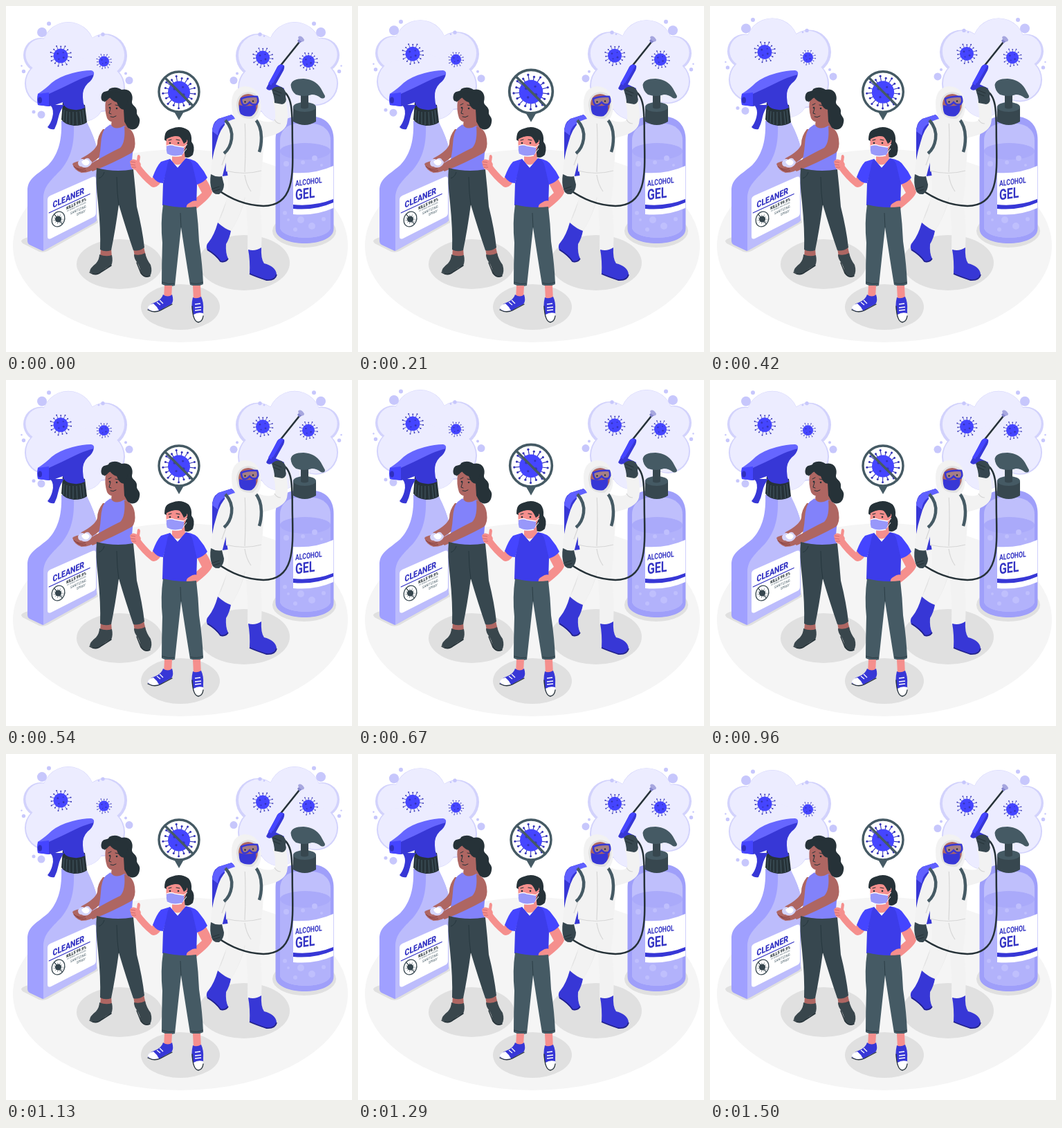
Write an HTML page that moves like this. It is 500 by 500 pixels and loops after 1.54 s.

```html
<!DOCTYPE html>
<html lang="en">
<head>
<meta charset="utf-8">
<title>Cleaning and disinfection</title>
<style>
html, body { margin: 0; width: 100%; height: 100%; overflow: hidden; background: #fff; }
svg { display: block; width: 100%; height: 100%; }
text { font-family: Roboto, "Open Sans", sans-serif; font-weight: 700; fill: #3434c4; }
.heavy { font-weight: 900; }
.note { font-weight: 400; fill: #455a64; }
.ink { fill: #263238; }
.slate { fill: #37474f; }
.steel { fill: #455a64; }
.boot { fill: #39464c; }
.blue { fill: #4545ff; }
.deep { fill: #3737d6; }
.suit { fill: #f2f2f2; }
.fold { fill: #e2e2e2; }
.brown { fill: #ae6662; }
.pink { fill: #f58f8d; }
.white { fill: #fff; }
.shade { fill: #e0e0e0; }
.line { fill: none; stroke: #263238; stroke-linecap: round; stroke-linejoin: round; }
</style>
</head>
<body>
<svg viewBox="0 0 500 500">
  <ellipse cx="252" cy="346.500" rx="242" ry="139.500" fill="#f5f5f5"/>

  <g id="clouds"></g>

  <g class="shade">
    <ellipse cx="164" cy="373" rx="62" ry="36"/>
    <ellipse cx="344" cy="371" rx="66" ry="40"/>
    <ellipse cx="252" cy="435" rx="57" ry="33"/>
    <ellipse cx="431" cy="325" rx="46" ry="24"/>
    <path d="M22 340Q22 337 32 334L130 300L133 313L60 354Q54 357 48 355L24 343Z"/>
  </g>

  <!-- spray bottle -->
  <g>
    <path fill="#a0a0ff" d="M80 166C81 191 77 213 61 230C45 244 31 249 31 267V340Q31 343 34 345L53 354L131 310V205Q128 190 117 170Z"/>
    <path fill="#bcbcfc" d="M98 172C99 199 94 219 80 236C66 251 54 260 54 278V354L128 313Q131 311 131 307V205Q128 190 117 168Z"/>
    <path class="white" d="M60 280Q60 276 64 274L125 247Q130 245 130 250V299Q130 303 126 305L65 336Q60 338 60 333Z"/>
    <g transform="matrix(.82 -.38 0 1 67.500 292)">
      <text class="heavy" font-size="12.800">CLEANER</text>
      <path d="M-7 4.500H66" stroke="#3434c4" stroke-width="1.300"/>
      <text class="heavy" x="24" y="11.500" font-size="6.200" style="fill:#263238">KILLS 99.9%</text>
      <text class="note" x="25" y="15" font-size="3">OF GERMS AND VIRUSES</text>
      <text class="note" x="31" y="21.500" font-size="5.200">SANITIZING</text>
      <text class="note" x="42" y="27.500" font-size="5.200">SPRAY</text>
    </g>
    <g transform="translate(75.500 308) rotate(24)">
      <ellipse rx="9" ry="11.200" class="white" stroke="#37474f" stroke-width="1.300"/>
      <g id="badge"></g>
      <path d="M-8-4L8 4" stroke="#37474f" stroke-width="1.200"/>
    </g>
    <path class="ink" d="M82 139L80 164Q84 171 98 173Q111 173 117 168L114 143Z"/>
    <path d="M84 150L83 166M88 152L87 169M92 153V171M97 153V172M102 153L103 172M107 152L109 171M111 150L113 169" stroke="#455a64" stroke-width="1"/>
    <path class="deep" d="M64 143Q70 150 67 161Q65 169 60 175Q64 179 70 178Q74 170 76 160Q78 151 84 143Z"/>
    <path class="deep" d="M46 127L62 121L108 103L127 98Q126 106 118 112Q110 120 111 132Q111 140 114 147Q105 152 93 149Q84 147 82 139Q73 143 62 145L46 143Z"/>
    <path fill="#6666ff" d="M46 127Q58 119 66 111Q77 102 96 97Q111 93 123 93Q128 94 127 99Q112 103 100 109Q82 118 62 127Z"/>
    <path class="blue" d="M46 127L62 125V145L46 143Q44 135 46 127Z"/>
    <ellipse cx="49" cy="136" rx="3" ry="4.500" fill="#2f2fbe"/>
  </g>

  <!-- gel bottle -->
  <g>
    <path fill="#9f9ffa" d="M389.500 193C389.500 173 402 162 416 160H447C462 162 473.500 173 473.500 193V322C473.500 350 389.500 350 389.500 322Z"/>
    <path fill="#bfbffc" d="M396 194C396 180 407 171 419 170H444C458 171 469 180 469 194V319C469 340 396 340 396 319Z"/>
    <path fill="#b2b2fb" d="M396 209C396 196 469 196 469 209V319C469 340 396 340 396 319Z"/>
    <ellipse cx="432.500" cy="210" rx="36.500" ry="12" fill="#aaaafa"/>
    <g fill="#bfbffd">
      <circle cx="429" cy="226" r="3"/><circle cx="446" cy="220" r="4"/><circle cx="456" cy="230" r="2"/>
      <circle cx="405" cy="228" r="4"/><circle cx="403" cy="299" r="3"/><circle cx="426" cy="309" r="5"/>
      <circle cx="442" cy="318" r="5"/><circle cx="459" cy="308" r="3"/><circle cx="418" cy="323" r="3"/><circle cx="408" cy="309" r="2"/>
    </g>
    <path class="white" d="M415 241Q447 243 473 231V292Q446 304 415 301Z"/>
    <path class="deep" d="M415 287Q446 290 473 279V284Q446 296 415 293Z"/>
    <g transform="matrix(.74 -.1 0 1 418 260.500)">
      <text font-size="11.700">ALCOHOL</text>
      <text y="20" font-size="21.500">GEL</text>
    </g>
    <path class="slate" d="M415 146Q431 137 448 146V167Q432 177 415 167Z"/>
    <ellipse cx="431.500" cy="146" rx="16.500" ry="7" class="steel"/>
    <path class="slate" d="M426 123H437V147Q431 150 426 147Z"/>
    <path class="steel" d="M411.500 114Q413 105 430 105Q447 106 455 119L461 130Q461 135 455 133Q449 128 442 128Q431 132 419 128Q412 123 411.500 114Z"/>
  </g>

  <!-- worker -->
  <g>
    <path class="deep" d="M298 184Q297 169 307 163L326 157L336 169L330 244L312 246Q298 237 298 225Z"/>
    <path fill="#6060ff" d="M298 181Q299 169 307 163L326 157L333 163L314 171Q307 176 306 187Z"/>
    <path class="fold" d="M321 231L328 260Q315 288 306 314L325 325Q345 294 350 255Z"/>
    <path class="suit" d="M319 233Q335 250 346 278Q350 315 349 353Q360 357 369 350Q371 315 366 281Q370 260 369 232Z"/>
    <path class="suit" d="M319 235Q327 276 306 314L325 325Q344 296 348 258Z"/>
    <path class="suit" d="M316 169Q332 160 348 162Q363 160 371 170Q374 204 369 239Q344 246 318 239Z"/>
    <path class="suit" d="M364 164Q382 171 389 164Q390 151 386 138L404 135Q409 156 406 170Q402 185 370 191Z"/>
    <path class="suit" d="M320 168Q309 177 304 198Q296 223 296 246L312 249Q318 223 326 203Z"/>
    <path d="M345 164Q347 200 345 240M318 238Q344 245 369 238M345 244Q347 258 354 268M388 164Q391 170 397 170M321 205L312 230" fill="none" stroke="#d6d6d6" stroke-width="1.200"/>
    <path d="M317 165Q328 177 326 192Q324 206 315 213" fill="none" stroke="#455a64" stroke-width="4.500"/>
    <path d="M359 162Q369 173 369 190Q369 202 366 211" fill="none" stroke="#455a64" stroke-width="4.500"/>

    <path class="suit" d="M326 141Q326 119 344 116Q362 116 367 133Q372 156 361 166Q347 174 333 166Q326 158 326 141Z"/>
    <path class="fold" d="M333 144Q333 126 350 124Q364 125 366 137Q368 155 356 163Q341 164 335 154Z"/>
    <path class="brown" d="M336 142Q337 128 350 127Q363 128 364 141Q364 153 355 158H343Q337 152 336 142Z"/>
    <path class="deep" d="M337 143Q347 146 361 143Q363 154 355 159Q346 161 339 156Q336 151 337 143Z"/>
    <path d="M340 134Q350 130 363 131Q366 138 362 142Q356 144 352 139Q348 144 343 143Q340 140 340 134Z" fill="#a57f86" stroke="#3737d6" stroke-width="2.600"/>
    <g class="ink"><circle cx="345.500" cy="138.500" r="1.200"/><circle cx="357" cy="137.500" r="1.200"/></g>

    <path class="deep" d="M306 313Q316 322 325 325Q323 336 318 344Q317 357 321 365Q318 371 310 370Q304 361 291 353Q288 346 293 341Q301 331 306 313Z"/>
    <path d="M291 352Q304 360 310 369Q317 371 321 365" fill="none" stroke="#22228c" stroke-width="1.800"/>
    <path class="deep" d="M350 352Q360 355 369 349Q368 365 373 372Q389 376 391 387Q389 396 376 396Q361 391 352 387Q353 368 350 352Z"/>
    <path d="M352 387Q361 391 376 396Q389 397 391 388" fill="none" stroke="#22228c" stroke-width="1.800"/>

    <path class="line" stroke-width="2.500" d="M398 122C417 129 413 165 414 198C415 245 416 289 372 289C342 288 320 276 304 264"/>
    <path class="line" stroke-width="2.600" d="M396 87L424 52"/>
    <path d="M421 50L426 45L431 49L424 54Z" fill="#8484cd"/>
    <ellipse cx="426.500" cy="47.500" rx="5" ry="3" transform="rotate(40 426.500 47.500)" fill="#a6a6df"/>
    <path class="deep" d="M376 119L392 88Q396 82 402 86Q403 90 400 95L386 120Q379 124 376 119Z"/>
    <path class="blue" d="M392 89Q396 82 401 86L384 115L379 112Z"/>
    <path class="deep" d="M385 111L402 119L398 126L382 118Z"/>
    <path class="slate" d="M384 121Q389 115 398 117Q406 122 404 131Q407 140 399 142L388 140Q388 132 384 121Z"/>
    <path d="M386 121L398 126M386 126L396 130" class="line" stroke-width="1"/>
    <path class="slate" d="M296 243Q304 248 312 246L315 258Q315 267 308 272Q299 273 297 265Q294 255 296 243Z"/>
    <path d="M299 264L308 261M300 268L309 265" class="line" stroke-width="1"/>
  </g>

  <!-- woman washing hands -->
  <g>
    <path class="ink" d="M148 133C140 143 136 135 138 129C140 121 148 125 149 120C156 116 163 118 167 121C179 118 185 128 182 138C181 144 190 145 189 153C188 159 195 160 193 168C192 177 184 181 178 177C171 184 160 178 162 168Z"/>
    <path class="brown" d="M140 178Q132 188 132 199Q130 209 109 220L104 228L113 233Q133 222 143 211Q151 195 148 178Z"/>
    <path class="brown" d="M153 161L152 174Q159 187 176 176L171 167L170 149Z"/>
    <path fill="#8282fa" d="M144 176L151 171Q157 181 171 173L179 178Q185 192 184 207Q181 221 183 237Q158 243 131 235Q136 215 137 200Q138 182 144 176Z"/>
    <path class="brown" d="M144 137Q142 150 146 162Q150 170 160 166Q169 161 170 150Q172 146 168 143Q162 145 159 131Q151 130 144 137Z"/>
    <path class="ink" d="M142 139Q142 126 154 124Q170 123 176 137L172 150Q164 151 160 139Q155 138 150 132Q147 136 142 139Z"/>
    <path d="M148 143L152 141M158 143L163 144M151 148L149 155L152 156M151 160Q155 162 159 159" class="line" stroke-width="1"/>
    <g class="ink"><circle cx="150" cy="147" r="1.300"/><circle cx="160" cy="148" r="1.300"/></g>
    <path class="brown" d="M171 174Q184 177 186 192Q188 206 182 212Q157 226 125 239L117 231Q148 213 165 205Q173 197 171 174Z"/>
    <path class="brown" d="M96 228Q104 222 118 225L129 233Q123 241 109 241Q98 237 96 228Z"/>
    <path d="M104 226Q108 219 113 222Q119 217 122 223Q126 225 122 230Q116 236 109 232Q104 232 104 226Z" fill="#d4d4fa"/>
    <path class="white" d="M109 225Q114 219 119 223Q123 226 118 230Q112 232 109 225Z"/>
    <path d="M98 232Q106 238 115 235M102 235Q108 240 116 238" fill="none" stroke="#843f40" stroke-width="1"/>
    <path class="brown" d="M137 350H152L153 363H136ZM184 350L199 348L202 361L186 363Z"/>
    <path class="slate" d="M131 234Q158 241 184 236Q187 264 189 290Q197 322 200 349Q192 355 184 353Q174 324 163 287Q158 324 152 353Q143 356 136 352Q137 323 133 284Q129 253 131 234Z"/>
    <path d="M160 247L161 270L163 288M142 240Q140 247 134 249" fill="none" stroke="#26373e" stroke-width="1"/>
    <path class="boot" d="M135 359Q144 363 153 360Q155 369 152 375Q144 378 138 384Q129 391 121 384Q121 379 130 372Q135 366 135 359Z"/>
    <path class="boot" d="M185 359Q194 361 201 357Q203 366 209 374Q212 384 208 390Q201 394 195 386Q193 375 189 370Q185 365 185 359Z"/>
    <path d="M121 385Q130 391 138 384L152 375M189 371L195 386Q201 394 208 390" class="line" stroke-width="1.500"/>
  </g>

  <!-- pin -->
  <g id="pin">
    <path class="steel" d="M242 151L250 165L258 151Z"/>
    <circle cx="250" cy="124" r="29" fill="#fff" stroke="#455a64" stroke-width="3.400"/>
    <g id="pinVirus"></g>
    <path d="M229.500 103.500L270.500 144.500" stroke="#455a64" stroke-width="3.400"/>
  </g>

  <!-- girl with mask -->
  <g>
    <path class="ink" d="M230 194Q227 180 240 177Q253 172 264 180Q269 186 268 196Q274 203 270 215Q263 222 256 217L244 205Z"/>
    <path class="pink" d="M240 213V224Q248 236 259 222L257 203Z"/>
    <path class="pink" d="M232 191Q230 205 235 214Q242 220 252 215Q259 209 261 200Q265 191 257 193Q249 184 232 191Z"/>
    <path class="ink" d="M229 194Q229 181 242 178Q256 177 262 187L261 196L257 199Q253 190 249 187Q238 188 229 194Z"/>
    <path d="M235 194L239 193M246 193L251 194" class="line" stroke-width="1.200"/>
    <g class="ink"><circle cx="237" cy="198" r="1.300"/><circle cx="249" cy="198" r="1.300"/></g>
    <path d="M255 205L262 200M255 214L261 206" stroke="#fff" stroke-width="1"/>
    <path fill="#9898fa" d="M232 202Q239 199 244 202L257 204Q258 211 254 216Q241 220 233 214Q231 208 232 202Z"/>
    <path d="M232 202Q239 199 244 202L257 204M233 214Q241 219 254 216" fill="none" stroke="#fff" stroke-width="1.300"/>

    <path class="pink" d="M218 239L211 249Q202 241 193 229L185 234Q196 250 210 261Q216 264 222 257L230 241Z"/>
    <path class="pink" d="M179 225Q182 219 189 223L190 216Q193 213 194 218L193 225Q197 230 192 236Q186 239 181 233Z"/>
    <path d="M180 225L187 226M180 229L187 230M182 233L188 233" stroke="#c96266" stroke-width=".8"/>
    <path class="pink" d="M277 239L289 250Q296 261 298 269Q296 277 275 293L263 292Q258 289 266 285Q274 278 283 270L274 253Z"/>
    <path class="blue" d="M237 221L248 234L260 220Q275 222 280 231Q287 239 291 248Q286 255 276 258L270 250L230 246L227 256Q218 256 212 247Q218 231 224 225Z"/>
    <path fill="#3c3ce9" d="M237 221L248 234L260 220Q268 222 270 232L276 258L275 291Q251 295 226 288L227 256L232 236Q233 226 237 221Z"/>
    <path class="pink" d="M266 284Q271 280 277 282L275 293Q268 296 262 293Q258 288 266 284Z"/>
    <path class="steel" d="M227 287Q251 293 275 290Q278 315 279 340Q284 374 285 402Q276 407 266 403Q260 366 253 320L244 404Q234 407 225 402Q225 371 226 342Q223 314 227 287Z"/>
    <path d="M252 299L253 320M225 399Q235 403 244 401M266 400Q276 403 285 399" fill="none" stroke="#2c3e46" stroke-width="1"/>
    <path class="pink" d="M229 404H240L239 423H228ZM270 404H281L282 425H271Z"/>
    <path class="deep" d="M227 417Q234 422 240 417Q243 426 239 431Q230 435 223 440Q211 443 205 438Q204 432 216 428Q225 424 227 417Z"/>
    <path class="white" d="M205 437Q204 432 213 430Q218 434 221 440Q210 443 205 437Z"/>
    <path d="M218 428L223 432M222 425L227 430" stroke="#fff" stroke-width="1.300"/>
    <path class="line" stroke-width="1.300" d="M205 439Q214 444 223 440L240 431"/>
    <path class="deep" d="M270 421Q275 424 282 420Q286 428 285 440Q286 455 278 457Q271 455 270 444Q267 433 270 421Z"/>
    <path class="white" d="M271 446Q277 442 285 444Q286 455 278 457Q271 455 271 446Z"/>
    <path d="M273 431L281 430M273 436L282 435M273 440L282 439" stroke="#fff" stroke-width="1.300"/>
    <path class="line" stroke-width="1.300" d="M269 434Q270 456 278 457Q284 456 285 448"/>
  </g>
</svg>
<script>
const $ = id => document.getElementById(id);
const disc = (x, y, r, fill) => `<circle cx="${x}" cy="${y}" r="${r}" fill="${fill}"/>`;
const discs = list => list.map(([x, y, r]) => disc(x, y, r, '#c7c7fc')).join('');

function virus(x, y, r, n = 15, core = '#4545ff', spike = '#3434b8') {
  let out = '';
  for (let i = 0; i < n; i++) {
    const a = (i + 0.3) * 2 * Math.PI / n;
    const len = r * (i % 2 ? 1.28 : 1.45);
    const px = (x + len * Math.cos(a)).toFixed(2);
    const py = (y + len * Math.sin(a)).toFixed(2);
    out += `<path d="M${x} ${y}L${px} ${py}" stroke="${spike}" stroke-width="${r * 0.07}"/>` +
      disc(px, py, r * 0.095, spike);
  }
  out += disc(x, y, r, core);
  for (const [dx, dy, k] of [[-0.4, -0.3, 0.13], [0.35, -0.45, 0.09], [0.4, 0.25, 0.14], [-0.25, 0.45, 0.1]])
    out += disc(x + dx * r, y + dy * r, k * r, spike);
  return out;
}

// x, y, radius, rim width (positive: rim on the left, negative: on the right)
const lobes = [[50, 71, 25, 3], [90, 61, 38, 0], [143, 72, 32, -3.5], [59, 112, 32, 1.5],
  [97, 112, 40, 0], [137, 118, 35, -1.5], [112, 137, 30, 0]];
const drops = [[52, 38, 7], [62, 25.5, 3], [134, 43.5, 1.3], [140, 41, 2.7], [178, 107.5, 5.5], [173, 97.5, 2],
  [25.5, 94.5, 2.7], [22.5, 86.5, 1.2]];
const lowDrops = [[51, 157, 5.5], [40, 153, 2.5]];

const cloud =
  lobes.map(([x, y, r]) => disc(x, y, r, '#d2d2fc')).join('') +
  lobes.map(([x, y, r, rim]) => disc(x + rim / 2, y - Math.abs(rim) / 4, r - Math.abs(rim) / 2 - 0.4, '#ececff')).join('') +
  discs(drops);

$('clouds').innerHTML = cloud + discs(lowDrops) + `<g transform="matrix(-1 0 0 1 507 0)">${cloud}</g>` +
  virus(79, 72, 10.5) + virus(141.5, 80, 7.5) + virus(371, 74.5, 10) + virus(437, 80, 9);
$('pinVirus').innerHTML = virus(250, 124.5, 16, 17);
$('badge').innerHTML = virus(0, 0, 4.6, 11, '#37474f', '#37474f');

const LOOP = 1540, CYCLE = 1500, RISE = 10;
const beats = [[0, 1], [0.1, 1.1], [0.3, 1], [0.4, 1], [0.5, 1.1], [0.6, 1], [1, 1]];

function beat(p) {
  const i = Math.max(1, beats.findIndex(b => p <= b[0]));
  const [p0, s0] = beats[i - 1], [p1, s1] = beats[i];
  return s0 + (s1 - s0) * (p - p0) / (p1 - p0);
}

function draw(t) {
  const p = Math.min(t % LOOP / CYCLE, 1);
  const lift = RISE * (1 - Math.abs(2 * p - 1));
  $('clouds').setAttribute('transform', `translate(0 ${-lift})`);
  $('pin').setAttribute('transform', `translate(250 129) scale(${beat(p)}) translate(-250 -129)`);
}

const start = performance.now();
function tick() {
  draw(performance.now() - start);
  requestAnimationFrame(tick);
}
draw(0);
requestAnimationFrame(tick);
</script>
</body>
</html>
```
